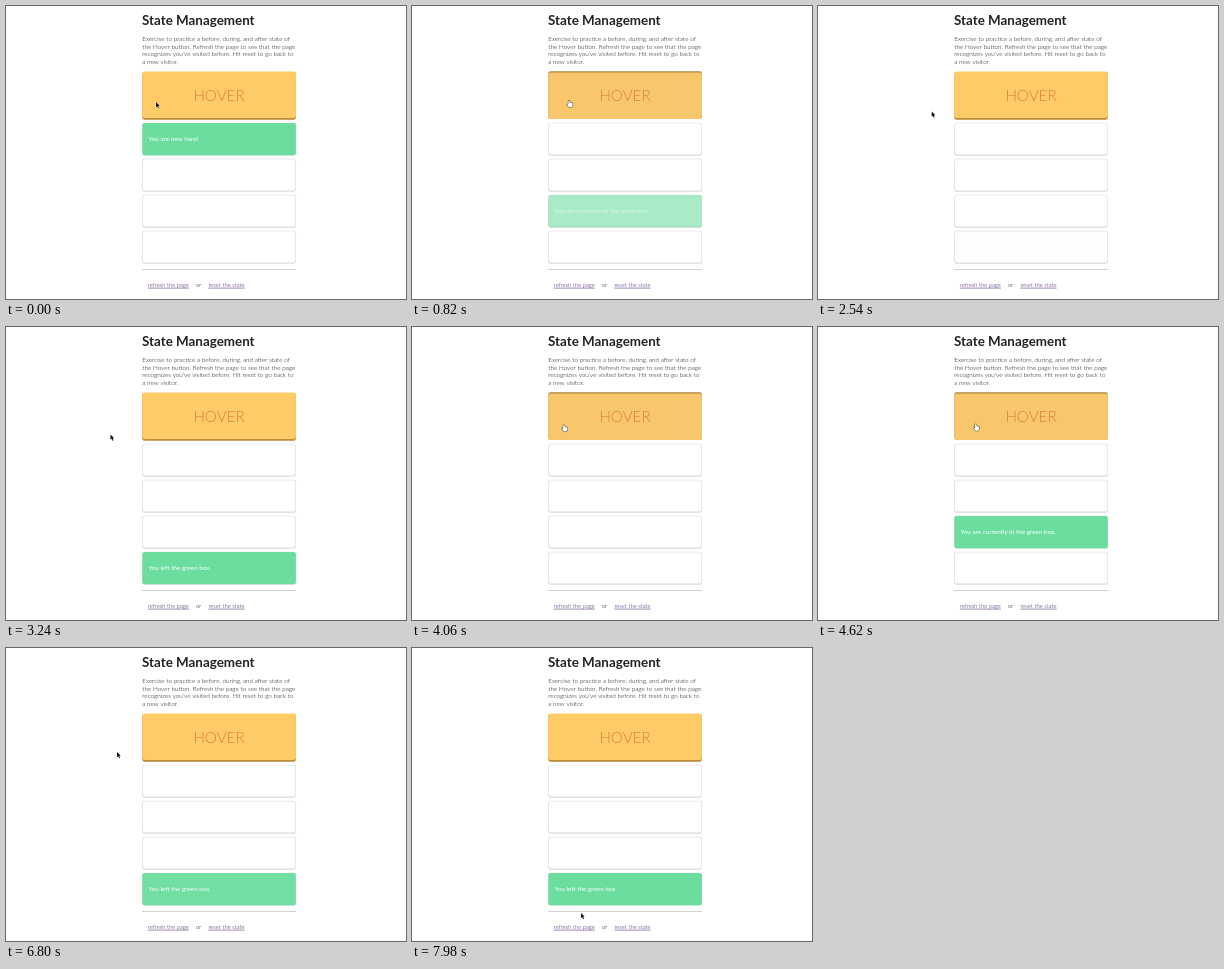
An HTML page with a canvas that plays this animation: 400x293 px, repeating every 8000 ms.

```html
<!DOCTYPE html>
<html lang="en">
<head>
<meta charset="utf-8">
<title>State Management</title>
<style>
html, body { margin: 0; width: 100%; height: 100%; overflow: hidden; background: #fff; }
canvas { display: block; width: 400px; height: 293px; }
</style>
</head>
<body>
<canvas id="stage"></canvas>
<script>
const W = 400, H = 293, LOOP = 8000, FADE = 400;
const canvas = document.getElementById('stage');
const ctx = canvas.getContext('2d');
const dpr = window.devicePixelRatio || 1;
canvas.width = W * dpr;
canvas.height = H * dpr;

const LEFT = 136.3, WIDTH = 153.6, BOX_H = 32.3, GREEN = '#6bdd9f';
const LABELS = ['You are new here!', '', 'You are currently in the green box.', 'You left the green box.'];
const boxTop = i => 117 + 36 * i;

// Spans during which the pointer rests on the button
const HOVERS = [[600, 2500], [4040, 5610], [6040, 6460]];

// Pointer stops, joined with easing: time, x, y
const STOPS = [
  [0, 150, 96], [1000, 158, 94], [2360, 150, 96], [2620, 104, 108],
  [3880, 105, 107], [4120, 160, 96], [5300, 155, 98], [5860, 119, 101],
  [6200, 152, 98], [6800, 111, 104], [LOOP, 169, 265]
];

const clamp = v => Math.max(0, Math.min(1, v));
const swing = p => 0.5 - Math.cos(Math.PI * clamp(p)) / 2;

function pointerAt(t) {
  const i = STOPS.findIndex(stop => stop[0] > t);
  const [t0, x0, y0] = STOPS[i - 1], [t1, x1, y1] = STOPS[i];
  const k = swing((t - t0) / (t1 - t0));
  return [x0 + (x1 - x0) * k, y0 + (y1 - y0) * k];
}

function stateAt(t) {
  let hover = false, box = 0, alpha = 1;
  for (const [enter, leave] of HOVERS) {
    if (t < enter) break;
    hover = t < leave;
    box = hover ? 2 : 3;
    alpha = swing((t - (hover ? enter : leave)) / FADE);
  }
  return { hover, box, alpha };
}

function text(str, x, y, size, color, weight = 300, align = 'left') {
  ctx.font = `${weight} ${size}px Lato, sans-serif`;
  ctx.textAlign = align;
  ctx.fillStyle = color;
  ctx.fillText(str, x, y);
}

function panel(y, h, fill, inset = 0) {
  ctx.beginPath();
  ctx.roundRect(LEFT + inset, y + inset, WIDTH - 2 * inset, h - 2 * inset, 2.3);
  ctx.fillStyle = fill;
  ctx.fill();
}

function drawHeader() {
  text('State Management', 136, 18.7, 13.4, '#222', 700);
  ['Exercise to practice a before, during, and after state of',
   'the Hover button. Refresh the page to see that the page',
   'recognizes you\u2019ve visited before. Hit reset to go back to',
   'a new visitor.'
  ].forEach((line, i) => text(line, 136.3, 35.3 + i * 7.55, 6.33, '#111'));
}

function drawButton(hover) {
  panel(hover ? 65.2 : 66, 47.7, hover ? '#a9853f' : '#bd8a35');
  panel(hover ? 66.4 : 65.4, 46.7, hover ? '#f8c76c' : '#ffcb66');
  text('HOVER', 213, 94.9, 15.2, '#dc7c40', 300, 'center');
}

function drawBoxes({ box, alpha }) {
  LABELS.forEach((label, i) => {
    const y = boxTop(i);
    panel(y, BOX_H + 0.4, '#dadada');
    panel(y - 0.3, BOX_H, '#e6e6e6');
    panel(y - 0.3, BOX_H, '#fff', 0.7);
    if (i !== box) return;
    ctx.globalAlpha = alpha;
    panel(y, BOX_H, GREEN);
    text(label, 142.4, y + 18.3, 6.35, '#fff', 400);
    ctx.globalAlpha = 1;
  });
}

function link(str, x) {
  text(str, x, 281, 5.85, '#3c1768');
  ctx.fillRect(x, 281.8, ctx.measureText(str).width, 0.5);
}

function drawFooter() {
  ctx.fillStyle = '#c6c6c6';
  ctx.fillRect(136, 263.2, 154, 0.8);
  link('refresh the page', 141.8);
  text('or', 189.9, 281, 5.85, '#111');
  link('reset the state', 202.4);
}

function shape(points, fill, line) {
  ctx.beginPath();
  points.forEach(([x, y]) => ctx.lineTo(x, y));
  ctx.closePath();
  ctx.lineJoin = 'round';
  ctx.strokeStyle = line;
  ctx.lineWidth = 0.9;
  ctx.stroke();
  ctx.fillStyle = fill;
  ctx.fill();
}

function drawPointer([x, y], hand) {
  ctx.save();
  ctx.translate(x, y);
  if (hand) {
    shape([[-1, 0.5], [0.3, 0.5], [0.6, 2.4], [3.2, 3], [3.3, 5], [2.3, 7],
      [-0.6, 7], [-2.4, 4.2], [-1, 4.2]], '#fff', '#222');
  } else {
    shape([[0, 0], [0, 5.2], [1.2, 4.2], [2.1, 6.3], [3, 5.9], [2.2, 3.9], [3.7, 3.8]],
      '#111', 'rgba(255,255,255,0.8)');
  }
  ctx.restore();
}

function frame(now) {
  const t = now % LOOP, state = stateAt(t);
  ctx.setTransform(dpr, 0, 0, dpr, 0, 0);
  ctx.fillStyle = '#fff';
  ctx.fillRect(0, 0, W, H);
  drawHeader();
  drawButton(state.hover);
  drawBoxes(state);
  drawFooter();
  drawPointer(pointerAt(t), state.hover);
}

const start = performance.now();
function tick() {
  frame(Math.max(0, performance.now() - start));
  requestAnimationFrame(tick);
}
tick();
</script>
</body>
</html>
```
